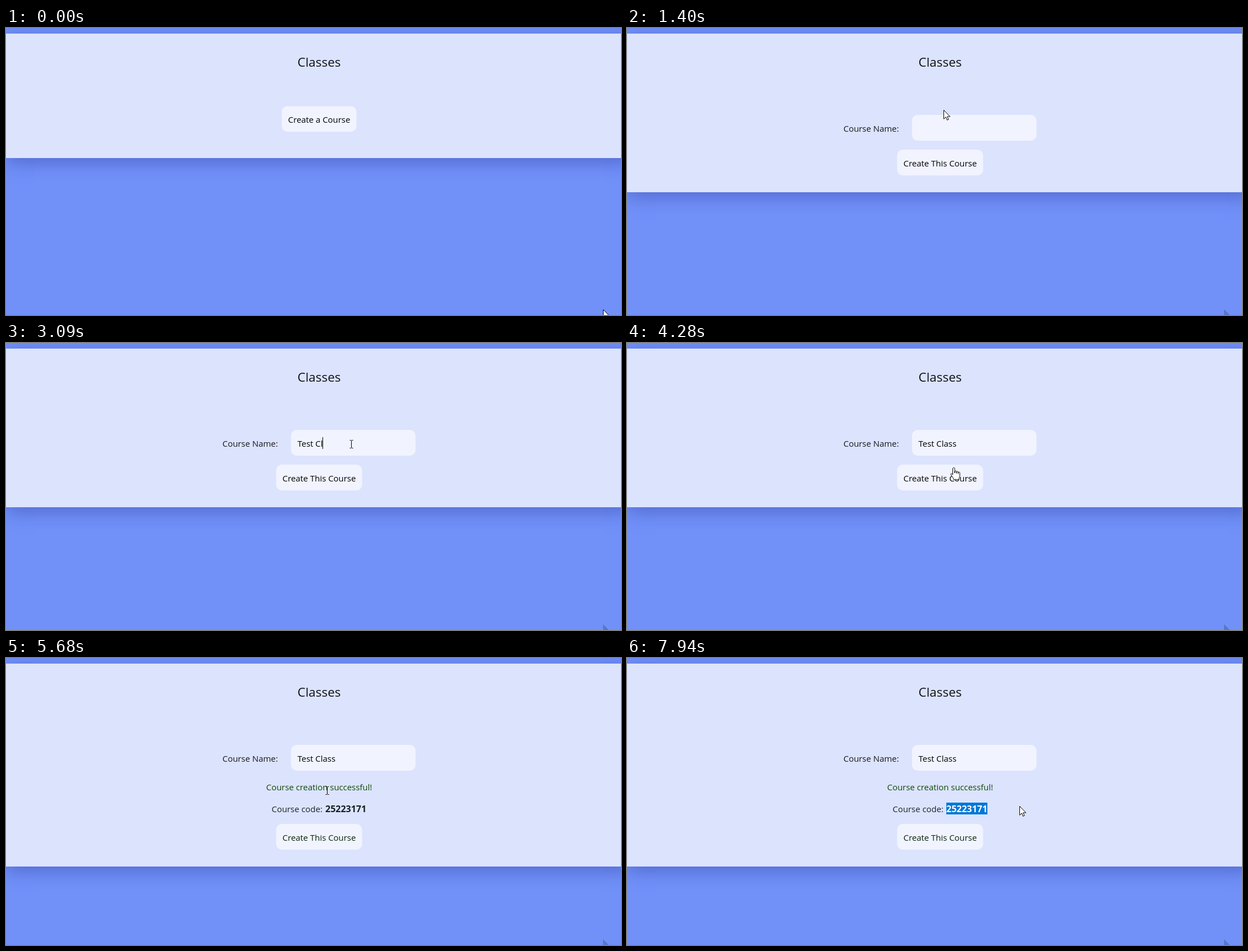
Recreate the animation shown at these times as an HTML page. Size 1094x512 px, loop 8000 ms.

```html
<!DOCTYPE html>
<html lang="en">
<head>
<meta charset="utf-8">
<title>Create a course</title>
<style>
  html, body { margin: 0; width: 100%; height: 100%; overflow: hidden; background: #7191f9; }
  #stage { position: relative; width: 100%; height: 100%; overflow: hidden; contain: strict; }
  #card {
    position: absolute; left: 0; top: 10px; width: 1114px; background: #dce3fd;
    box-shadow: 0 8px 32px rgba(31, 38, 135, .37);
  }
  svg { position: absolute; left: 0; top: 0; display: block; }
  text { font: 14.9px "Open Sans", "Noto Sans", sans-serif; fill: #000; white-space: pre; }
  .title { font-size: 22.4px; fill: #10121a; }
  .label { fill: #14171c; }
  .mid { text-anchor: middle; }
  .bold { font-size: 16px; font-weight: 700; fill: #142024; }
  .box { fill: #f1f3ff; }
  .pointer { fill: #fff; stroke: #000; stroke-linejoin: round; }
</style>
</head>
<body>
<div id="stage">
<div id="card"></div>
<svg width="1094" height="512" viewBox="0 0 1094 512">
  <defs>
    <path id="arrowShape" d="M.5 .5V16.3L4.2 12.8 6.6 18.3 9 17.2 6.7 12H11.7Z"/>
  </defs>
  <text class="title mid" x="557" y="68.5">Classes</text>

  <g id="start">
    <rect class="box" x="490.5" y="139.5" width="133" height="45.5" rx="10"/>
    <text class="mid" x="557" y="169">Create a Course</text>
  </g>

  <g id="form">
    <text class="label" x="385" y="185">Course Name:</text>
    <rect class="box" x="507" y="155" width="221.5" height="46" rx="10"/>
    <text id="entry" x="518.6" y="185"></text>
    <rect id="caret" y="168" width="1" height="21"/>
    <g id="submit">
      <rect class="box" x="480.5" y="217" width="153" height="46" rx="10"/>
      <text id="submitText" class="mid" x="557" y="246.5">Create This Course</text>
    </g>
  </g>

  <g id="result">
    <text class="mid" x="557" y="235.5" style="fill:#0c4a04">Course creation successful!</text>
    <text x="472.5" y="275" style="fill:#10262a">Course code:</text>
    <rect id="selection" x="568" y="258" height="21" fill="#0078d7"/>
    <text class="bold" x="568" y="275"><tspan id="picked" fill="#fff"></tspan><tspan id="unpicked"></tspan></text>
  </g>

  <use href="#arrowShape" x="1062" y="502" fill="#5c76c6" stroke="#5c76c6"/>
  <g id="cursor">
    <circle id="halo" r="12" fill="#f6f67a"/>
    <use id="arrow" class="pointer" href="#arrowShape"/>
    <path id="hand" class="pointer" d="M-1.5 13V2C-1.5-.2 2-.2 2 2V10 7.2C2.3 5.8 5 5.9 5.2 7.6V10.5 7.8C5.6 6.6 8 6.7 8.2 8.5V11 9C8.8 7.6 11 8 11 9.8V15C11 17.5 9.5 18 9.3 21.8H.2C0 18.5-3 16-4.8 12.8-5.5 11-3.5 10-1.5 13Z"/>
    <path id="beam" fill="none" stroke="#000" d="M-3-7H-1L0-6.3 1-7H3M0-6.3V6.3M-3 7H-1L0 6.3 1 7H3"/>
  </g>
</svg>
</div>
<script>
const LOOP = 8000;
const ENTRY = "Test Class";
const CODE = "25223171";
const KEY_TIMES = [2120, 2270, 2500, 2600, 2690, 2850, 3090, 3250, 3330, 3410];
const CLICKS = [[1320, 1400], [1640, 1800], [5450, 5530], [7320, 7710]];
const CARET_ON = [[1720, 3880], [4440, 4990]];

// time, x, y, pointer shape
const POINTER = [
  [0, 1062, 502, "arrow"], [70, 1050, 490, "arrow"], [150, 985, 430, "arrow"],
  [230, 880, 340, "arrow"], [310, 760, 245, "arrow"], [390, 660, 175, "arrow"],
  [470, 600, 137, "arrow"], [540, 575, 128, "arrow"], [620, 562, 140, "hand"],
  [700, 563, 146, "hand"], [1400, 563, 146, "arrow"], [1560, 562.5, 161.5, "beam"],
  [1950, 614.5, 180.5, "beam"], [3880, 555.5, 170.5, "beam"], [3960, 518.5, 162.5, "beam"],
  [4040, 566.5, 161.5, "beam"], [4200, 580.5, 180.5, "beam"], [4280, 581, 222, "hand"],
  [4360, 574, 233, "hand"], [4440, 569, 235, "hand"], [5680, 571.5, 236.5, "beam"],
  [6140, 480.5, 235.5, "beam"], [6220, 395, 230, "arrow"], [6300, 367, 235, "arrow"],
  [6460, 385, 228, "arrow"], [6540, 455, 226, "arrow"], [6620, 560.5, 240.5, "beam"],
  [6700, 652, 258, "arrow"], [6780, 645, 280, "arrow"], [6860, 606.5, 277.5, "beam"],
  [6940, 576.5, 270.5, "beam"], [7010, 567.5, 268.5, "beam"], [7400, 634.5, 269.5, "beam"],
  [7470, 702, 268, "arrow"], [7870, 700, 266, "arrow"], [7940, 698, 264, "arrow"]
];

const el = id => document.getElementById(id);
const show = (id, visible) => el(id).style.display = visible ? "" : "none";
const within = (spans, t) => spans.some(([from, to]) => t >= from && t < to);
const pen = document.createElement("canvas").getContext("2d");

function textWidth(node, text) {
  pen.font = getComputedStyle(node).font;
  return pen.measureText(text).width;
}

function drawForm(t) {
  const open = t >= 1400, done = t >= 5680;
  el("card").style.height = (done ? 362 : open ? 283 : 222) + "px";
  show("start", !open);
  show("form", open);
  show("result", done);
  el("submit").setAttribute("transform", `translate(0 ${done ? 79 : 0})`);
  el("submitText").style.fill = done ? "#082408" : "#000";

  const typed = ENTRY.slice(0, KEY_TIMES.filter(k => k <= t).length);
  el("entry").textContent = typed;
  el("caret").setAttribute("x", Math.round(518.2 + textWidth(el("entry"), typed)));
  show("caret", within(CARET_ON, t));
}

function drawSelection(t) {
  const count = t >= 7470 ? CODE.length : t >= 7400 ? 7 : 0;
  const picked = CODE.slice(0, count);
  el("picked").textContent = picked;
  el("unpicked").textContent = CODE.slice(count);
  el("selection").setAttribute("width", textWidth(el("picked"), picked));
}

function drawPointer(t) {
  const [, x, y, shape] = POINTER.findLast(step => step[0] <= t);
  el("cursor").setAttribute("transform", `translate(${x} ${y})`);
  for (const name of ["arrow", "hand", "beam"]) show(name, name === shape);
  show("halo", within(CLICKS, t));
}

function frame() {
  const t = performance.now() % LOOP;
  drawForm(t);
  drawSelection(t);
  drawPointer(t);
  requestAnimationFrame(frame);
}
frame();
</script>
</body>
</html>
```
